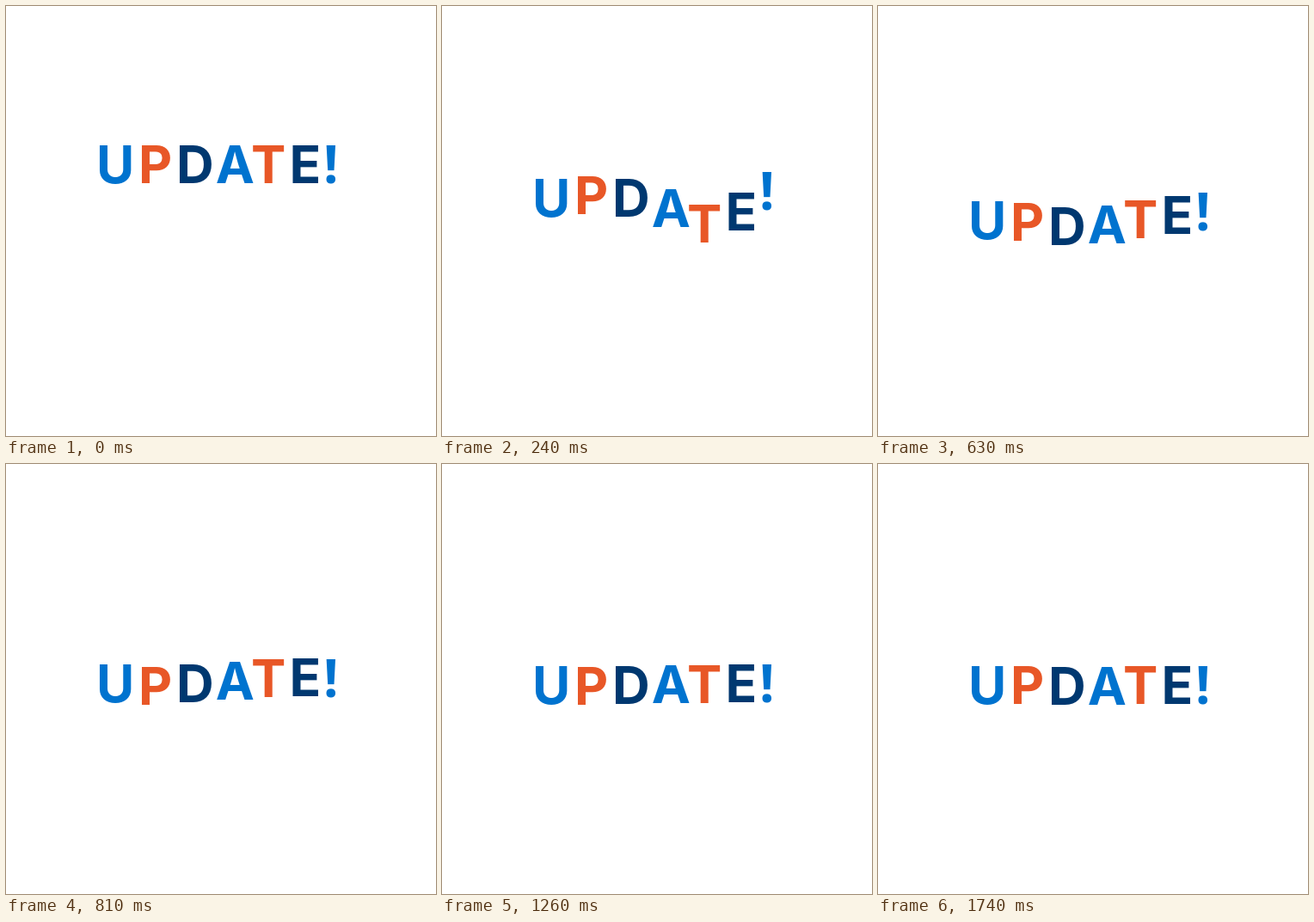
An HTML page with a canvas for the animation above (1770 ms loop, 500 by 500 pixels).

```html
<!DOCTYPE html>
<html lang="en">
<head>
<meta charset="utf-8">
<title>Update!</title>
<style>
  html, body { margin: 0; width: 100%; height: 100%; overflow: hidden; background: #fff; }
  canvas { display: block; width: 500px; height: 500px; }
</style>
</head>
<body>
<canvas id="stage" width="500" height="500" role="img" aria-label="UPDATE!">UPDATE!</canvas>
<script>
const ctx = document.getElementById('stage').getContext('2d');

const BLUE = '#0073cf', ORANGE = '#e85727', NAVY = '#003870';
const CAPS = '700 60.5px Inter, sans-serif';
const MARK = '700 61.5px "Open Sans", "Noto Sans", sans-serif';

// Glyph, centre of its ink, colour, font
const letters = [
  ['U', 127, BLUE, CAPS],
  ['P', 174, ORANGE, CAPS],
  ['D', 220, NAVY, CAPS],
  ['A', 266.2, BLUE, CAPS],
  ['T', 305.6, ORANGE, CAPS],
  ['E', 348, NAVY, CAPS],
  ['!', 378, BLUE, MARK]
];

const STEP = 30, STEPS = 59;
const FLOOR = 279.7, DROP = 74;
const BOUNCE = 7.4, DECAY = 0.093, DELAY = 0.1; // in steps

// Each letter starts one step after the one before it
function height(step, index) {
  const age = Math.max(0, step - index - DELAY);
  return DROP * Math.exp(-DECAY * age) * Math.abs(Math.cos(Math.PI * age / BOUNCE));
}

function draw(step) {
  ctx.fillStyle = '#fff';
  ctx.fillRect(0, 0, 500, 500);
  letters.forEach(([glyph, centre, color, font], i) => {
    ctx.font = font;
    ctx.fillStyle = color;
    const ink = ctx.measureText(glyph);
    const x = centre - (ink.actualBoundingBoxRight - ink.actualBoundingBoxLeft) / 2;
    ctx.fillText(glyph, x, FLOOR - height(step, i));
  });
}

const start = performance.now();
function tick() {
  const elapsed = performance.now() - start;
  draw(Math.floor(elapsed / STEP) % STEPS);
  requestAnimationFrame(tick);
}
tick();
</script>
</body>
</html>
```
